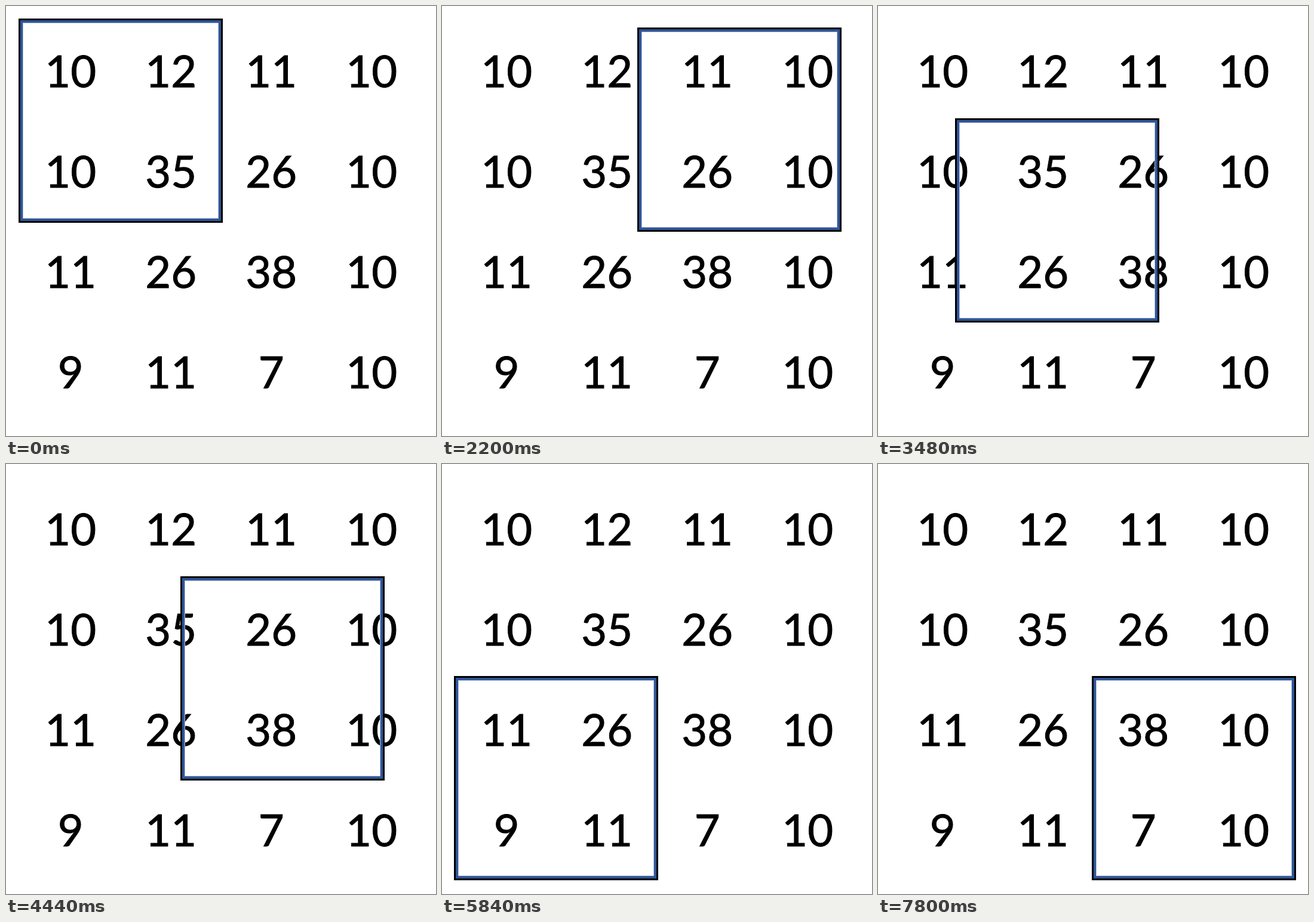
An HTML page with a canvas for the animation above (7880 ms loop, 720 by 720 pixels).

```html
<!DOCTYPE html>
<html lang="en">
<head>
<meta charset="utf-8">
<title>Sliding window</title>
<style>
  html, body { margin: 0; width: 100%; height: 100%; overflow: hidden; background: #fff; }
  svg, canvas { position: absolute; left: 0; top: 0; width: 720px; height: 720px; }
  text { font: 74px Lato, sans-serif; text-anchor: middle; fill: #000; stroke: #000; stroke-width: 1; }
</style>
</head>
<body>
<svg id="grid" viewBox="0 0 720 720"></svg>
<canvas id="stage" width="720" height="720"></canvas>
<script>
const LOOP = 7880, STEP = 40;
const BEAT = 976, MOVE = 844, LAG = 64;
const SIZE = 342, STOPS = 3;

const rows = ["10 12 11 10", "10 35 26 10", "11 26 38 10", "9 11 7 10"];

const grid = document.getElementById("grid");
rows.forEach((row, r) => row.split(" ").forEach((value, c) => {
  const label = document.createElementNS("http://www.w3.org/2000/svg", "text");
  label.setAttribute("x", 108.2 + 168 * c);
  label.setAttribute("y", 136 + 168 * r);
  label.textContent = value;
  grid.append(label);
}));

const ctx = document.getElementById("stage").getContext("2d");

function ease(u) {
  return u < 0.5 ? 2 * u * u : 1 - 2 * (1 - u) ** 2;
}

// the window visits its stops in reading order
function stop(k) {
  const r = Math.floor(k / STOPS), c = k % STOPS;
  return [20.6 + 168.8 * c - 0.3 * r, 20.5 + 167 * r];
}

// moves follow a steady beat, the first ones slightly late
function startOf(k) {
  return BEAT * k + LAG * (1 + 0.25 ** k);
}

function position(t) {
  let k = 0;
  while (k < STOPS * STOPS - 2 && startOf(k + 1) <= t) k++;
  const u = Math.min(1, Math.max(0, (t - startOf(k)) / MOVE));
  const to = stop(k + 1);
  return stop(k).map((from, i) => Math.round(from + (to[i] - from) * ease(u)));
}

function ring(x, y, inset, width, color) {
  const d = inset + width / 2;
  ctx.strokeStyle = color;
  ctx.lineWidth = width;
  ctx.strokeRect(x + d, y + d, SIZE - 2 * d, SIZE - 2 * d);
}

function draw(t) {
  const [x, y] = position(t);
  ctx.clearRect(0, 0, 720, 720);
  ring(x, y, 7, 1, "#b4c3dd");
  ring(x, y, 3, 4, "#2f5597");
  ring(x, y, 0, 3, "#000");
}

const begin = performance.now();
function tick() {
  const t = (performance.now() - begin) % LOOP;
  draw(Math.floor(t / STEP) * STEP);
  requestAnimationFrame(tick);
}
tick();
</script>
</body>
</html>
```
